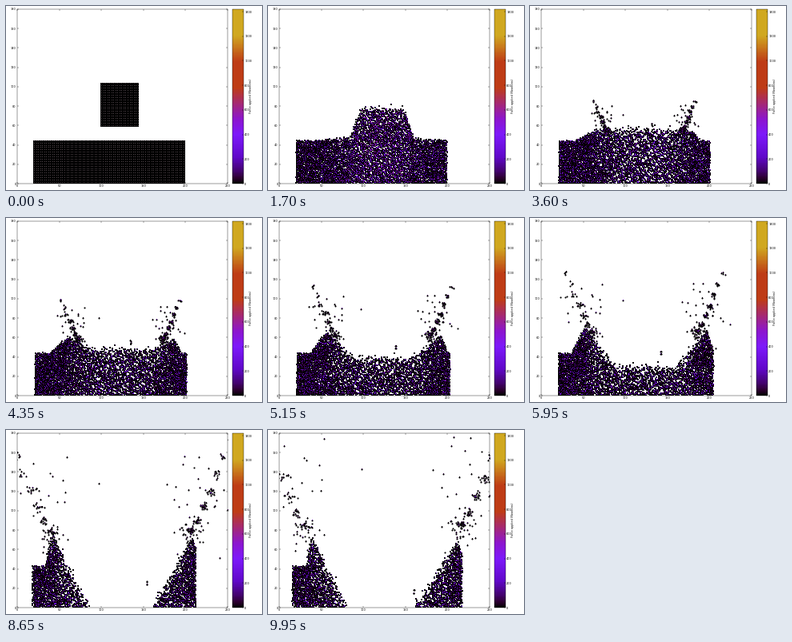
Write a matplotlib script that moves like this. It is 320 px wide and 230 px high and loops after 10 s.

```python
import numpy as np
import matplotlib.pyplot as plt
from matplotlib.animation import FuncAnimation
from matplotlib.cm import ScalarMappable
from matplotlib.colors import LinearSegmentedColormap, Normalize

W, H, DPI = 320, 230, 80
FRAMES, STEP_MS = 200, 50
PX = 72 / DPI            # one pixel in points
SPACING = 1.2
CENTRE = 122
GAP, CONTACT = 14, 0.7   # fall distance and time of impact
LAUNCH = 1.3             # time the spray leaves the rims
F_MAX = 1420

plt.rcParams.update({"font.family": "DejaVu Sans", "font.size": 3.2,
                     "axes.linewidth": 0.35})
rng = np.random.default_rng(7)
GRID = np.linspace(0, 250, 2001)


def bulk_height(x, s):
    """Outline of the bulk, s seconds after the impact."""
    shelf = 45 - 0.22 * s
    floor = max(85 + 5 * np.exp(-3 * s) - 11.2 * s, 0)
    rise = np.sin(np.pi * s / 15) ** 2
    walls = 19.5 + 1.1 * s - 0.16 * s ** 2, 199.5 - 0.4 * s + 0.25 * s ** 2

    def side(peak, foot, ramp, top):
        q = np.clip((x - peak) / (foot - peak), 0, 1)
        inner = floor + (top - floor) * (1 - q) ** 1.2
        outer = shelf + (top - shelf) * np.clip(1 - abs(x - peak) / ramp, 0, 1)
        return np.where((x - peak) * (foot - peak) > 0, inner, outer)

    left = side(30 + 68.9 * np.exp(-s / 4.5), 99 - 1.8 * s,
                50 * np.exp(-s / 4.5), shelf + 33 * rise)
    right = side(225 - 80.7 * np.exp(-s / 5), 160 - 15.8 * np.exp(-s / 3),
                 9, shelf + 29 * rise)
    h = np.where(x < CENTRE, left, right)
    return np.where((x > walls[0]) & (x < walls[1]), h, 0)


def outline(s):
    h = bulk_height(GRID, s)
    return h, np.concatenate([[0], np.cumsum((h[1:] + h[:-1]) / 2)])


def lattice(x0, y0, cols, rows):
    i, j = np.meshgrid(np.arange(cols), np.arange(rows))
    seam = (i % 2 == 0) & (j % 2 == 0)
    return (x0 + SPACING * i).ravel(), (y0 + SPACING * j).ravel(), seam.ravel()


base = lattice(20.1, 0.8, 150, 37)
block = lattice(100, 45.6, 37, 37)
rest_x, rest_y, seam = (np.concatenate(p) for p in zip(base, block))
count = len(rest_x)
in_block = np.arange(count) >= len(base[0])

# Each particle keeps its share of the area (u) and of the column height (v)
h_rest, area_rest = outline(0)
u = np.interp(rest_x, GRID, area_rest / area_rest[-1])
v = rest_y / np.interp(rest_x, GRID, h_rest)
near = np.exp(-((rest_x - CENTRE) / 50) ** 2)
arrival = CONTACT + np.abs(rest_x - CENTRE) / 300
rank = rng.random(count)
jitter = rng.normal(size=(2, count))
rough = 4 * np.abs(rng.normal(size=count)) * near * v ** 8
waves = [(rng.normal(0, 0.7, 2), rng.uniform(0, 6.3)) for _ in range(7)]


def bulk_at(t):
    s = t - CONTACT
    if s <= 0:
        return rest_x, rest_y - in_block * GAP * s / CONTACT, rank >= 0
    h, area = outline(s)
    x = np.interp(u, area / area[-1], GRID)
    y = v * np.interp(x, GRID, h)
    shake = np.clip((t - arrival) / 0.6, 0, 1)
    size = shake * (0.35 + near * (0.3 + 0.06 * s))
    x, y = x + size * jitter[0], y + size * jitter[1] + shake * rough
    # random waves open voids in the stirred middle
    tear = 0.45 * near * np.clip(s / 3, 0, 1)
    dx, dy = 0, 0
    for k, phase in waves:
        push = tear * np.sin(k[0] * x + k[1] * y + phase) / np.hypot(*k)
        dx, dy = dx + k[0] * push, dy + k[1] * push
    shown = rank < 1.25 * area[-1] / area_rest[-1]
    return x + dx, np.maximum(np.abs(y + dy), 0.5), shown


def make_spray():
    """Origins and velocities of the loose particles."""
    origins, speeds = [], []

    def burst(origin, velocity, n, spread):
        origins.append(rng.normal(origin, 0.8, (n, 2)))
        speeds.append(rng.normal(velocity, spread, (n, 2)))

    for x, sign, size in ((95, -1, 10), (150, 1, 24)):
        for a in np.linspace(0, 1, 7):
            burst((x, 45), (sign * (7.6 + 6.4 * a), 4.6 + 13 * a ** 1.2),
                  int(size * (1 - a)) + 4, 0.3)
        burst((x, 45), (sign * 9, 9), 32, 3.2)
        burst((x, 45), (sign * 7.6, 4), 32, 1)
    burst((121.6, 76.3), (4.4, -7), 4, 0.08)
    return np.concatenate(origins), np.concatenate(speeds)


origin, speed = make_spray()


def force_at(t, x, noise):
    hit = np.exp(-((x - CENTRE) / 42) ** 2) * np.exp(-max(t - 1.7, 0) / 1.1)
    calm = 65 + 35 * np.exp(-((t - 2.8) / 0.9) ** 2)
    grow = np.clip((t - arrival) / 0.4, 0, 1)
    return grow * (calm + 150 * hit) * noise ** 1.3


STOPS = [(0, "#000000"), (0.03, "#2c0030"), (0.07, "#43026d"),
         (0.15, "#6008c8"), (0.28, "#7d19fa"), (0.37, "#8c16cd"),
         (0.55, "#be3c16"), (0.7, "#be3c16"), (0.85, "#d0a820"), (1, "#d0a820")]
cmap = LinearSegmentedColormap.from_list("force", STOPS)

fig = plt.figure(figsize=(W / DPI, H / DPI), dpi=DPI, facecolor="white")
ax = fig.add_axes([14 / W, 8 / H, 263 / W, 218 / H])
ax.set(xlim=(0, 250), ylim=(0, 180),
       xticks=range(0, 251, 50), yticks=range(0, 181, 20))
ax.tick_params(direction="in", top=True, right=True, length=1.6, width=0.3,
               pad=1.3)

cax = fig.add_axes([283 / W, 8 / H, 14 / W, 218 / H])
bar = fig.colorbar(ScalarMappable(Normalize(0, F_MAX), cmap), cax=cax,
                   ticks=range(0, 1401, 200))
bar.outline.set_linewidth(0.35)
cax.tick_params(direction="in", length=1.6, width=0.3, pad=1)
fig.text(306.5 / W, 117.5 / H, "Force applied (Newtons)", rotation=90,
         ha="center", va="center", fontsize=3.2)


def points(marker, color, size=1, z=4):
    return ax.plot([], [], marker, color=color, ms=size * PX, mew=0, zorder=z)[0]


# Colour steps are even in the square root of the force
ROOT_STEP, LEVELS = 4, 6
dots = points("s", "black", 2.01, 3)
drops = points("o", "black", 2.1, 3)
seams = points(",", "#4d4247")
cores = [points(",", cmap((ROOT_STEP * k) ** 2 / F_MAX))
         for k in range(1, LEVELS + 1)]


def draw(frame):
    t = frame * STEP_MS / 1000
    noise = np.random.default_rng(frame)
    x, y, shown = bulk_at(t)
    force = force_at(t, x, noise.exponential(size=count))
    still = seam & (t < arrival)
    seams.set_data(x[still], y[still])
    x, y, force = x[shown], y[shown], force[shown]
    dots.set_data(x, y)

    loose = origin + speed * max(t - LAUNCH, 0)
    if t <= LAUNCH:
        loose = loose[:0]
    drops.set_data(loose[:, 0], loose[:, 1])
    x, y = np.append(x, loose[:, 0]), np.append(y, loose[:, 1])
    force = np.append(force, 35 * noise.exponential(size=len(loose)))

    level = np.clip(np.rint(np.sqrt(force) / ROOT_STEP), 0, LEVELS)
    for k, core in enumerate(cores, 1):
        core.set_data(x[level == k], y[level == k])
    return [dots, drops, seams, *cores]


anim = FuncAnimation(fig, draw, frames=FRAMES, interval=STEP_MS, repeat=True,
                     blit=False)
plt.show()
```
